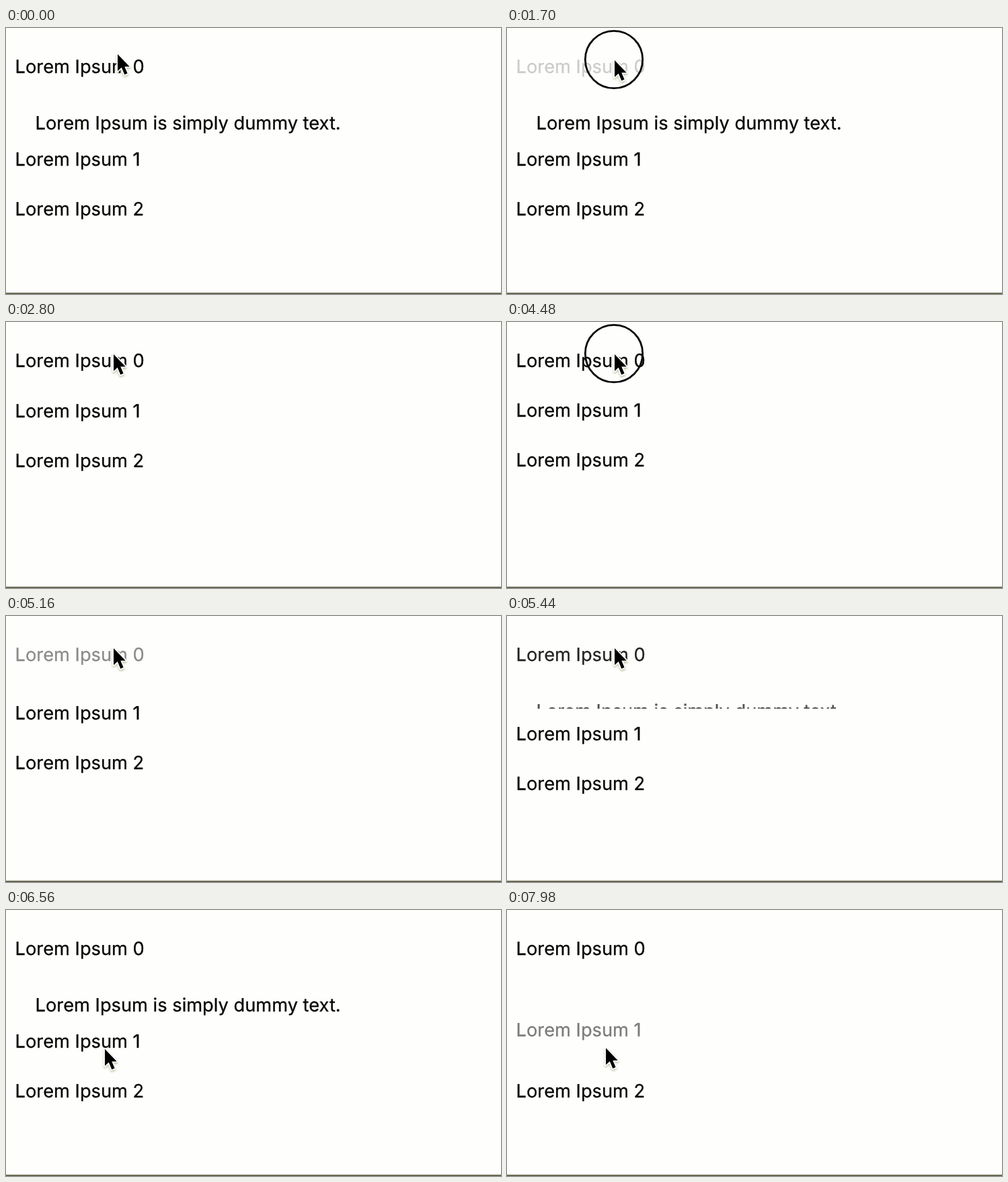
An HTML page for the animation above (8 s loop, 736 by 396 pixels).

```html
<!DOCTYPE html>
<html lang="en">
<head>
<meta charset="utf-8">
<title>Accordion</title>
<style>
  html, body { margin: 0; width: 100%; height: 100%; overflow: hidden; background: #fefefc; }
  svg { display: block; width: 736px; height: 396px; }
  text {
    font: 400 27.25px Inter, "Liberation Sans", sans-serif;
    fill: #060603; stroke: #060603; stroke-width: .3px;
    text-rendering: geometricPrecision;
  }
</style>
</head>
<body>
<svg viewBox="0 0 736 396">
  <defs>
    <clipPath id="panel"><rect id="mask" y="93.5" width="736" height="64"/></clipPath>
    <filter id="shade" x="-50%" y="-50%" width="200%" height="200%">
      <feDropShadow dx="0" dy="2" stdDeviation="1.6" flood-color="#77753a" flood-opacity=".45"/>
    </filter>
  </defs>
  <rect width="736" height="396" fill="#fefefc"/>
  <rect y="394" width="736" height="2" fill="#6c6a55"/>
  <text id="item0" x="13.6" y="67">Lorem Ipsum 0</text>
  <g clip-path="url(#panel)">
    <text id="body" x="43.6" y="151">Lorem Ipsum is simply dummy text.</text>
  </g>
  <text id="item1" x="13.6">Lorem Ipsum 1</text>
  <text id="item2" x="13.6">Lorem Ipsum 2</text>
  <circle id="ring" r="42.7" fill="none" stroke="#060603" stroke-width="2.8"/>
  <path id="cursor" d="M0 0V25L5.8 19.8L10.3 30.4L14.6 28.6L10.3 18.4H17.8Z" fill="#000"
    stroke="#fff" stroke-width="3.4" stroke-linejoin="round" paint-order="stroke" filter="url(#shade)"/>
</svg>
<script>
const LOOP = 8000, PANEL = 64;
const CLICKS = [1540, 4480, 7260];
const PRESS = 150, RELEASE = 280;
const SLIDE = { delay: 370, length: 970 };
const FADE = { delay: 330, length: 870 };

// time, x, y of the pointer tip
const PATH = [
  [0, 166, 39], [680, 166, 39], [900, 169, 44], [1150, 157, 51], [1400, 160, 48],
  [5980, 160, 48], [6040, 161, 69], [6140, 162, 71], [6300, 169, 145],
  [6440, 151, 219], [6560, 147, 207], [6860, 147, 207], [7120, 147, 205.5], [LOOP, 147, 205.5]
];

const $ = id => document.getElementById(id);
const set = (id, attrs) => {
  for (const key in attrs) $(id).setAttribute(key, attrs[key]);
};
const clamp = v => Math.min(1, Math.max(0, v));
const ease = u => u < .5 ? 2 * u * u : 1 - 2 * (1 - u) ** 2;
const run = (t, start, { delay, length }) => ease(clamp((t - start - delay) / length));

function tip(t) {
  const i = Math.max(1, PATH.findIndex(p => p[0] >= t));
  const [t0, x0, y0] = PATH[i - 1], [t1, x1, y1] = PATH[i];
  const k = ease((t - t0) / (t1 - t0));
  return [x0 + (x1 - x0) * k, y0 + (y1 - y0) * k];
}

// dims while pressed, then recovers
function titleOpacity(t, start) {
  const down = ease(clamp((t - start) / PRESS));
  return 1 - .8 * down * (1 - run(t, start, FADE));
}

function draw(t) {
  const [close, open, swap] = CLICKS.map(c => run(t, c, SLIDE));
  const first = 1 - close + open - swap;
  const bodyShown = t < CLICKS[0] + SLIDE.delay ? 1 : t < CLICKS[2] + SLIDE.delay ? open : 0;

  set('item0', { opacity: titleOpacity(t, CLICKS[0]) * titleOpacity(t, CLICKS[1]) });
  set('item1', { y: 141 + PANEL * first, opacity: titleOpacity(t, CLICKS[2]) });
  set('item2', { y: 215 + PANEL * (first + swap) });
  set('mask', { height: PANEL * first });
  set('body', { opacity: bodyShown });

  const [x, y] = tip(t);
  const pressed = CLICKS.some(c => t >= c && t < c + RELEASE);
  set('ring', { cx: x - 1, cy: y - 1, visibility: pressed ? 'visible' : 'hidden' });
  set('cursor', { transform: `translate(${x} ${y})` });
}

const begin = performance.now();
function tick() {
  draw((performance.now() - begin) % LOOP);
  requestAnimationFrame(tick);
}
tick();
</script>
</body>
</html>
```
